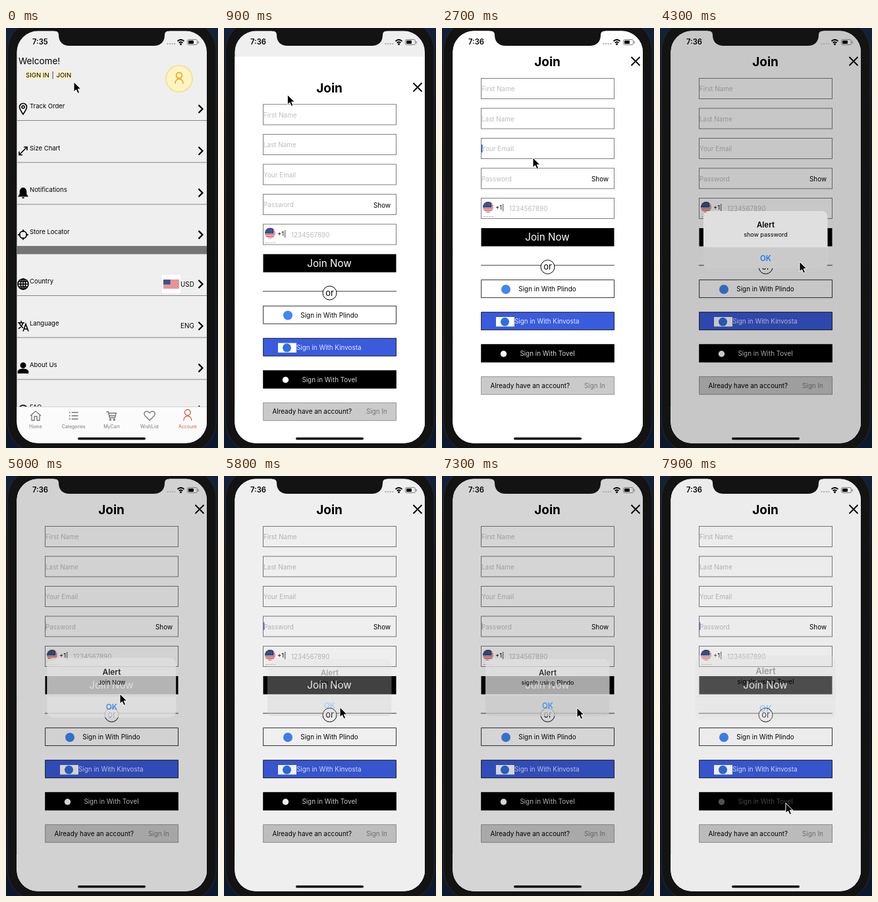
These frames come from a looping animation (322x638 px, 8 s). An HTML page:

```html
<!DOCTYPE html>
<html lang="en">
<meta charset="utf-8">
<title>Join screen</title>
<style>
  html, body { margin: 0; height: 100%; overflow: hidden; background: #0c1420; }
  svg { display: block; width: 322px; height: 638px; font: 9.9px Inter, "Noto Sans", sans-serif; }
  .mid { text-anchor: middle; }
  .icon { fill: none; stroke: #000; stroke-width: 1.6; }
  .field { fill: none; stroke: #7d7d7d; }
  .hint { fill: #bdbdbd; }
  .bold { font-weight: 600; }
</style>
<svg viewBox="0 0 322 638">
  <defs>
    <clipPath id="screenClip"><rect x="16.400" y="4.600" width="288.600" height="626" rx="32"/></clipPath>
    <clipPath id="listClip"><rect x="16" y="4" width="289" height="571"/></clipPath>
    <clipPath id="roundClip"><circle cx="70" cy="272" r="8"/></clipPath>
    <linearGradient id="desk" x2="0" y2="1">
      <stop stop-color="#12213a"/><stop offset=".2" stop-color="#17181c"/>
      <stop offset=".6" stop-color="#0c0f17"/><stop offset="1" stop-color="#0b1930"/>
    </linearGradient>
    <g id="flag">
      <rect width="24" height="13" fill="#fff"/>
      <path d="M0 .5H24M0 2.5H24M0 4.5H24M0 6.5H24M0 8.5H24M0 10.5H24M0 12.5H24" stroke="#c92a38" stroke-width="1.100"/>
      <rect width="10.500" height="7" fill="#2d407a"/>
      <path d="M1 1.800H10M1 3.600H10M1 5.400H10" stroke="#fff" stroke-width=".5" stroke-dasharray=".6 1.200"/>
    </g>
    <g id="person" fill="none">
      <circle cy="-4" r="4.400"/><path d="M-6 8.500C-6 -1 6 -1 6 8.500"/>
    </g>
  </defs>
  <rect width="322" height="638" fill="url(#desk)"/>
  <rect x="2.500" y="-12" width="316.500" height="657" rx="46" fill="#131313" stroke="#292929"/>
  <g clip-path="url(#screenClip)">
    <g id="account">
      <rect x="16" y="4" width="289" height="627" fill="#efefef"/>
      <text x="19" y="55" font-size="13.500">Welcome!</text>
      <path d="M29 65H66V78H29ZM76 65H99.500V78H76Z" fill="#fcf2c4"/>
      <g font-size="9.600"><text x="30" y="75">SIGN IN</text><text x="69.500" y="75">|</text><text x="76.500" y="75">JOIN</text></g>
      <circle cx="263" cy="77" r="20" fill="#fdf4c4" stroke="#f3e183" stroke-width="1.600"/>
      <use href="#person" x="263" y="76" stroke="#efa41c" stroke-width="1.700"/>
      <g id="rows" clip-path="url(#listClip)"></g>
      <rect x="16" y="575" width="289" height="56" fill="#fbfbfb"/>
      <path d="M16 575.500H305" stroke="#d5d5d5"/>
      <g id="tabs" class="mid" font-size="7"></g>
    </g>
    <g id="join">
      <rect x="16" y="4" width="289" height="627" fill="#fff"/>
      <text class="mid" x="160" y="58" font-size="19" font-weight="700">Join</text>
      <path d="M287.500 44L300.500 57M300.500 44L287.500 57" stroke="#000" stroke-width="1.900"/>
      <g id="fields"></g>
      <text x="227" y="233">Show</text>
      <g clip-path="url(#roundClip)"><use href="#flag" transform="translate(62 264) scale(1.250)"/></g>
      <path d="M63 286.500H78" stroke="#bbb" stroke-dasharray="3 1"/>
      <text x="81" y="276" font-size="9.500">+1|</text>
      <rect id="caret" x="59.500" width="2" height="12" fill="#3f62d8"/>
      <rect x="59.500" y="304" width="202" height="27.600"/>
      <text class="mid" x="160" y="323" font-size="15.200" fill="#fff">Join Now</text>
      <path d="M59 360.500H262" stroke="#777" stroke-width="1.600"/>
      <circle cx="160.500" cy="363" r="10.500" fill="#fff" stroke="#000"/>
      <text class="mid" x="160.500" y="367" font-size="13">or</text>
      <g stroke="#000" stroke-width=".8">
        <rect x="59.700" y="382.700" width="201.700" height="27" fill="#fff"/>
        <rect x="59.700" y="431.700" width="201.700" height="27" fill="#3a5bdc"/>
        <rect x="59.700" y="480.700" width="201.700" height="27"/>
        <rect x="59.700" y="529.700" width="201.700" height="27" fill="#cacaca" stroke="#808080"/>
      </g>
      <circle cx="97" cy="397" r="7" fill="#4285f4"/>
      <text class="mid" x="160" y="400">Sign in With Plindo</text>
      <rect x="82" y="439" width="28" height="14.500" fill="#fff"/>
      <circle cx="95.500" cy="446.300" r="6.500" fill="#2f6fe0"/>
      <text x="110" y="449" fill="#e3e8fb">Sign in With Kinvosta</text>
      <g id="pressed">
        <circle cx="93.500" cy="495" r="4.700" fill="#fff"/>
        <text class="mid" x="160" y="498" fill="#d8d8d8">Sign in With Tovel</text>
      </g>
      <text x="73.500" y="546.500">Already have an account?</text>
      <text x="216" y="546.500" fill="#777">Sign In</text>
    </g>
    <rect id="dim" x="16" y="4" width="289" height="627"/>
    <text id="clock" class="bold" x="40" y="25" font-size="11.200"></text>
    <path d="M244.500 24H258" stroke="#aaa" stroke-width="2" stroke-dasharray="2 1.600"/>
    <g fill="none" stroke="#000" stroke-width="2">
      <path d="M260.500 20Q265.500 15.500 270.500 20M262.700 22.500Q265.500 20 268.300 22.500"/>
      <circle cx="265.500" cy="24.500" r=".6"/>
    </g>
    <rect x="275.500" y="17.500" width="15" height="8" rx="2.200" fill="none" stroke="#777"/>
    <rect x="277" y="19" width="8" height="5" rx="1"/>
    <path d="M292.300 20V23.500" stroke="#777"/>
    <rect x="109" y="622" width="103" height="3.600" rx="1.800"/>
    <g id="alert" class="mid">
      <rect x="66" y="278" width="188.500" height="87" rx="9" fill="#e0e0e0"/>
      <path id="okPressed" d="M66 333H254.500V356Q254.500 365 245.500 365H75Q66 365 66 356Z" fill="#cbcbcb"/>
      <path d="M66 333.500H254.500" stroke="#cecece"/>
      <text class="bold" x="160.500" y="303" font-size="11.500">Alert</text>
      <text id="message" x="160.500" y="317" font-size="9"></text>
      <text class="bold" x="160.500" y="353.500" font-size="11.500" fill="#1a7df5">OK</text>
    </g>
  </g>
  <path d="M73 3.500V4.600Q80 4.600 80 10.500C80 21 86 27 97 27H224C235 27 241 21 241 10.500Q241 4.600 248 4.600V3.500Z" fill="#131313"/>
  <path id="cursor" d="M0 0V15L3.500 11.800L6 17.300L8.600 16.200L6.200 10.800H11Z" stroke="#fff" stroke-width="1"/>
</svg>
<script>
const $ = id => document.getElementById(id);
const LOOP = 8000;

const listRows = [
  ["Track Order", '<path d="M0 8C-4 2-5.500 0-5.500-3A5.500 5.500 0 0 1 5.500-3C5.500 0 4 2 0 8Z"/><circle cy="-3" r="2"/>'],
  ["Size Chart", '<path d="M-6 6L6-6M1-6H6V-1M-6 1V6H-1"/>'],
  ["Notifications", '<path fill="#000" d="M-6.500 5L-4.500 2V-2C-4.500-9 4.500-9 4.500-2V2L6.500 5ZM-1.500 7.500H1.500"/>'],
  ["Store Locator", '<circle r="5.500"/><path d="M0-8V-4M0 8V4M-8 0H-4M8 0H4"/>'],
  ["Country", '<circle r="8"/><ellipse rx="3.700" ry="8"/><path d="M-8 0H8M0-8V8M-7-4H7M-7 4H7"/>', "USD"],
  ["Language", '<path d="M-8-5H2M-3-8V-5M0-5Q-2 1-7 4M-6-5Q-4 0 0 3M0 8L4-3L8 8M1.500 4.500H6.500"/>', "ENG"],
  ["About Us", '<circle cy="-4" r="3.700" fill="#000"/><path fill="#000" d="M-7.500 7.500V5C-5 1 5 1 7.500 5V7.500Z"/>'],
  ["FAQ", '<circle r="7"/><path d="M-2-2C-2-5 3-4 2-1L0 1V3"/>'],
];
$("rows").innerHTML = listRows.map(([label, icon, value = ""], i) => {
  const y = 123 + 63.7 * i + (i > 3 ? 11.2 : 0);
  return `<g class="icon" transform="translate(26 ${y})">${icon}</g>
    <text x="36" y="${y - 1}" font-size="9.500">${label}</text>
    <text x="265" y="${y + 3.5}">${value}</text>
    <path class="icon" style="stroke-width:2.2" d="M292.500 ${y - 6}L298.500 ${y}L292.500 ${y + 6}"/>
    <path d="M16 ${y + 17.5}H305" stroke="#858585"/>`;
}).join("") +
  `<rect x="16" y="331.500" width="289" height="12" fill="#757575"/>
   <rect x="237" y="375" width="28" height="28" fill="#fff"/><use href="#flag" x="239" y="382.500"/>`;

const tabs = [
  ["Home", '<path d="M-8 0L0-7L8 0M-6-1V7H-2V1H2V7H6V-1"/>'],
  ["Categories", '<path d="M-3-5H7M-3 0H7M-3 5H7M-7-5H-5M-7 0H-5M-7 5H-5"/>'],
  ["MyCart", '<path d="M-8-6H-5L-3 3H5L7-4H-4.500M-3 0H6"/><circle cx="-2" cy="6" r="1"/><circle cx="4" cy="6" r="1"/>'],
  ["WishList", '<path d="M0 7L-7 0C-11-5-4-10 0-4C4-10 11-5 7 0Z"/>'],
  ["Account", '<use href="#person" y="-1"/>'],
];
$("tabs").innerHTML = tabs.map(([label, icon], i) => {
  const color = i === 4 ? "#d4583c" : "#757575", x = 45 + i * 57.7;
  return `<g transform="translate(${x} 589)" fill="none" stroke="${color}" stroke-width="1.300">${icon}</g>
    <text x="${x}" y="608" fill="${color}">${label}</text>`;
}).join("");

const hints = ["First Name", "Last Name", "Your Email", "Password", "1234567890"];
$("fields").innerHTML = hints.map((hint, i) => {
  const y = 76.5 + i * 45.5;
  return `<rect class="field" x="59.500" y="${y}" width="202" height="31"/>
    <text class="hint" x="${i === 4 ? 102 : 60}" y="${y + 19.5}">${hint}</text>`;
}).join("");

// Pointer stops: time, x, y
const stops = [
  [0, 103, 82], [100, 103, 82], [350, 87, 73], [800, 87, 73], [1250, 160, 294], [1350, 160, 294],
  [1700, 205, 490], [1850, 235, 441], [2200, 138, 91], [2300, 138, 93], [2420, 137, 138],
  [2600, 138, 197], [2750, 138, 197], [2880, 138, 237], [3050, 138, 237], [3500, 238, 230],
  [3750, 238, 230], [4150, 212, 355], [4380, 212, 355], [4700, 173, 331], [5100, 173, 331],
  [5450, 175, 350], [5750, 175, 350], [6250, 210, 397], [6750, 210, 397], [7100, 205, 352],
  [7300, 205, 352], [7700, 191, 497], [8000, 191, 497],
];
// Alerts: opened, dismissed, message
const alerts = [
  [3630, 4360, "show password"],
  [4750, 5640, "Join Now"],
  [6450, 7220, "signIn using Plindo"],
  [7800, 9000, "signIn using Tovel"],
];
// Focus changes: time, caret top
const focuses = [[2200, 86], [2400, 131], [2550, 177], [3080, 222]];

const clamp = v => Math.max(0, Math.min(1, v));
const smooth = v => v * v * (3 - 2 * v);
const latest = (list, t) => list.filter(item => item[0] <= t).pop();

function moveCursor(t) {
  const i = stops.findIndex(stop => stop[0] > t);
  const [t0, x0, y0] = stops[i - 1], [t1, x1, y1] = stops[i];
  const k = smooth((t - t0) / (t1 - t0));
  $("cursor").setAttribute("transform", `translate(${x0 + (x1 - x0) * k} ${y0 + (y1 - y0) * k})`);
}

// Opens with a damped spring, closes with a plain fade; returns its visibility
function showAlert(t) {
  const current = latest(alerts, t);
  let shown = 0, scale = 1;
  if (current) {
    const [opened, closed, message] = current;
    const age = (t - opened) * .012;
    const spring = 1 - (1 + age) * Math.exp(-age);
    shown = spring * (1 - smooth(clamp((t - closed) / 250)));
    scale = 1.2 - .2 * spring;
    $("message").textContent = message;
    $("okPressed").setAttribute("opacity", t > closed - 110 ? 1 : 0);
  }
  $("alert").setAttribute("opacity", shown);
  $("alert").setAttribute("transform", `translate(160.500 321.500) scale(${scale}) translate(-160.500 -321.500)`);
  $("dim").setAttribute("opacity", .22 * shown);
  return shown;
}

function draw(now) {
  const t = now % LOOP;
  const slide = 627 * (1 - clamp((t - 600) / 500)) ** 3;
  $("join").setAttribute("transform", `translate(0 ${slide})`);
  $("clock").textContent = t < 600 ? "7:35" : "7:36";
  moveCursor(t);
  const shown = showAlert(t);
  const focus = latest(focuses, t);
  $("caret").setAttribute("opacity", focus ? 1 - shown : 0);
  if (focus) $("caret").setAttribute("y", focus[1]);
  $("pressed").setAttribute("opacity", 1 - .65 * clamp((t - 7720) / 80));
  requestAnimationFrame(draw);
}
requestAnimationFrame(draw);
</script>
</html>
```
